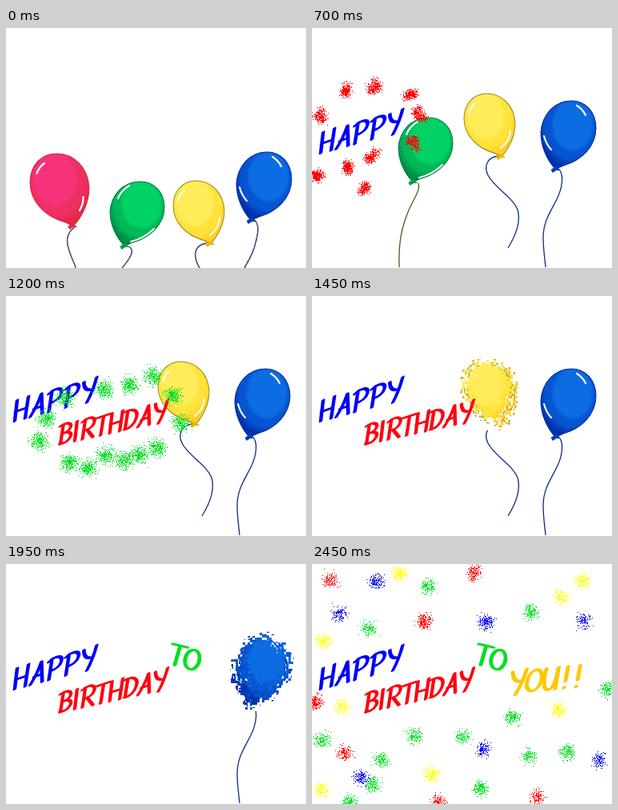
An HTML page with a canvas that plays this animation: 375x300 px, repeating every 3450 ms.

```html
<!DOCTYPE html>
<html lang="en">
<head>
<meta charset="utf-8">
<title>Happy Birthday To You!!</title>
<style>
  html, body { margin: 0; width: 100%; height: 100%; overflow: hidden; background: #fff; }
  canvas { display: block; width: 375px; height: 300px; }
</style>
</head>
<body>
<canvas id="stage" width="375" height="300" role="img" aria-label="HAPPY BIRTHDAY TO YOU!!"></canvas>
<script>
const W = 375, H = 300, LOOP = 3450;
const context = canvas => canvas.getContext('2d', { willReadFrequently: true });
const ctx = context(document.getElementById('stage'));
const RED = '#ff0000', GREEN = '#00e024', BLUE = '#0000fa', YELLOW = '#ffff00';

let seed = 1;
function rand() {
  seed = (Math.imul(seed, 1664525) + 1013904223) >>> 0;
  return seed / 4294967296;
}
const spread = r => (rand() * 2 - 1) * r;
const bell = s => (rand() + rand() + rand() + rand() - 2) * 1.73 * s;

// Balloons: box when risen, offset while low, colours from lit to shaded
const skin = new Path2D('M.26 1C.1 .86 0 .66 0 .47C.02 .2 .25 0 .55 0C.82 0 1 .17 1 .4C1 .68 .72 .88 .42 .95C.35 .97 .3 1 .26 1Z');
const balloons = [
  { x: 17, y: 76, w: 74, h: 90, flip: true, low: [13, 81],
    tones: ['#f6337a', '#ee2f62', '#e02a48'], edge: '#d82848', tie: '#e02a48',
    glints: 'M25.5 101Q28 93 35 88M83.5 130Q84 139 79 147',
    cord: 'M71 168C60 174 64 192 70 204C77 218 86 230 89 250C91 270 88 285 87 300',
    lowCord: 'M86 249C75 256 75 268 79 278C81 286 85 292 87 300' },
  { x: 108, y: 112, w: 68, h: 80, low: [22, 80],
    tones: ['#00d266', '#00b858', '#008c46'], edge: '#007a3c', tie: '#00a04e',
    glints: 'M118 133Q122 123 132 117M134 187Q151 183 163 171',
    cord: 'M133 194C136 203 126 215 120 230C112 250 108 268 109 299',
    lowCord: 'M153 273C162 277 156 287 145 300' },
  { x: 190, y: 82, w: 64, h: 78, flip: true, low: [19, 109],
    tones: ['#ffec58', '#ffe23a', '#ffcf22'], edge: '#9c8a1c', tie: '#f0b400',
    glints: 'M196 107Q198 99 204 94M248 128Q247 142 236 150',
    cord: 'M235 160C220 160 214 172 220 184C228 200 250 210 257 227C262 244 253 262 245 275',
    lowCord: 'M251 269C235 271 233 285 242 300' },
  { x: 286, y: 91, w: 69, h: 85, low: [2, 64],
    tones: ['#0c6ce2', '#0654d0', '#0030ac'], edge: '#002c9c', tie: '#0040b8',
    glints: 'M331 97Q338 101 342 109M290 135Q293 146 299 152',
    cord: 'M307 175C316 181 313 200 306 214C298 230 289 242 289 262C289 276 291 288 292 299',
    lowCord: 'M309 239C318 244 315 258 311 272C308 284 302 292 298 300' }
];

function drawBody(g, b) {
  g.save();
  g.translate(b.flip ? b.x + b.w : b.x, b.y);
  g.scale(b.flip ? -b.w : b.w, b.h);
  const lit = g.createRadialGradient(.58, .36, 0, .58, .36, .8);
  [[0, 0], [.42, 0], [.5, 1], [.62, 1], [.78, 2], [1, 2]]
    .forEach(([at, i]) => lit.addColorStop(at, b.tones[i]));
  g.fillStyle = lit;
  g.fill(skin);
  g.lineWidth = 1 / b.w;
  g.strokeStyle = b.edge;
  g.stroke(skin);
  g.restore();

  const kx = b.x + b.w * (b.flip ? .72 : .27), ky = b.y + b.h - 1;
  g.fillStyle = b.tie;
  g.beginPath();
  g.moveTo(kx, ky - 2);
  g.lineTo(kx + 6, ky + 3);
  g.lineTo(kx + 1, ky + 3);
  g.lineTo(kx - 4, ky + 6);
  g.lineTo(kx - 6, ky + 2);
  g.fill();

  g.strokeStyle = '#f4fbff';
  g.lineWidth = 2.2;
  g.lineCap = 'round';
  g.stroke(new Path2D(b.glints));
}

function drawCord(b, path, low) {
  const p = new Path2D(path);
  ctx.lineWidth = 1.3;
  ctx.strokeStyle = b === balloons[1] && !low ? '#4c5a18' : '#0c2c84';
  ctx.stroke(p);
  if (!low) return;
  ctx.setLineDash([2, 4]);
  ctx.strokeStyle = '#e0305c';
  ctx.stroke(p);
  ctx.lineDashOffset = 3;
  ctx.strokeStyle = '#108070';
  ctx.stroke(p);
  ctx.setLineDash([]);
  ctx.lineDashOffset = 0;
}

function drawBalloon(b, low) {
  drawCord(b, low ? b.lowCord : b.cord, low);
  ctx.save();
  if (low) ctx.translate(...b.low);
  drawBody(ctx, b);
  ctx.restore();
}

// Bursting balloon: small chunks fetched from random neighbours
function drawShattered(b) {
  const copy = document.createElement('canvas');
  copy.width = W;
  copy.height = H;
  drawBody(context(copy), b);
  ctx.save();
  ctx.beginPath();
  ctx.rect(0, b.y + b.h + 8, W, H);
  ctx.clip();
  drawCord(b, b.cord);
  ctx.restore();
  for (let y = b.y - 8; y < b.y + b.h + 12; y += 3)
    for (let x = b.x - 8; x < b.x + b.w + 8; x += 3)
      ctx.drawImage(copy, x + Math.round(spread(6)), y + Math.round(spread(6)), 3, 3, x, y, 3, 3);
}

// Brush lettering: strokes and advance per letter
const P = 'M4 0L2 26M0 3C10 -4 18 0 16 7C15 12 9 15 4 15';
const glyphs = {
  H: ['M3 0L2 26M17 -1L15 26M2 14L16 13', 20],
  A: ['M0 26Q8 14 12 0L15 26M4 17L14 16', 20],
  P: [P, 20],
  Y: ['M1 0C2 8 5 12 11 12M17 -2Q14 14 7 27', 18],
  B: ['M4 1L2 26M0 2C10 -3 17 2 13 8C11 11 8 12 5 12C14 11 17 15 14 20C11 25 6 26 1 25', 19],
  I: ['M3 0L2 26', 10],
  R: [P + 'M7 14L16 26', 19],
  T: ['M0 2L18 0M9 1L7 26', 17],
  D: ['M4 1L2 25M0 2C12 -2 18 5 16 13C14 21 8 26 1 25', 19],
  O: ['M10 0C3 2 0 10 1 17C3 26 11 27 15 20C20 12 18 0 10 0Z', 20],
  U: ['M2 0C0 12 0 25 7 25C13 25 15 12 16 0L15 25', 22],
  '!': ['M5 0L4 17M3 24L3.2 25', 14]
};
const words = [
  { text: 'HAPPY', x: 11, y: 131, tilt: -.27, lean: -.08, size: 1, gap: 1.3, ink: BLUE },
  { text: 'BIRTHDAY', x: 68, y: 161, tilt: -.22, lean: -.08, size: .95, gap: 0, ink: '#ff0010' },
  { text: 'TO', x: 209, y: 98, tilt: .35, lean: -.2, size: 1, gap: 0, ink: GREEN },
  { text: 'YOU!!', x: 250, y: 135, tilt: -.1, lean: -.12, size: 1.08, gap: 0, ink: '#ffc800' }
];

function drawWord(w) {
  ctx.save();
  ctx.transform(w.size, w.tilt * w.size, w.lean * w.size, w.size, w.x, w.y);
  ctx.strokeStyle = w.ink;
  ctx.lineWidth = 2.4;
  ctx.lineCap = ctx.lineJoin = 'round';
  for (const c of w.text) {
    const [path, step] = glyphs[c], p = new Path2D(path);
    for (const nib of [-1, 0, 1]) {
      ctx.save();
      ctx.translate(nib * 1.1, -nib * .3);
      ctx.stroke(p);
      ctx.restore();
    }
    ctx.translate(step + w.gap, 0);
  }
  ctx.restore();
}

// Sprayed dots
function spray(x, y, size, count, ink) {
  ctx.fillStyle = ink;
  for (let i = 0; i < count; i++)
    ctx.fillRect(Math.round(x + bell(size)), Math.round(y + bell(size)), 1, 1);
}
const pairs = list => list.flatMap((v, i) => i % 2 ? [] : [[v, list[i + 1]]]);
const ring = (n, x, y, rx, ry) => Array.from({ length: n }, (_, i) => {
  const a = i / n * Math.PI * 2;
  return [x + rx * Math.cos(a) + spread(5), y + ry * Math.sin(a) + spread(5)];
});

function clumps(points, ink) {
  for (const [x, y] of points)
    for (let k = 0; k < 4; k++) spray(x + spread(6), y + spread(6), 2.9, 75, ink);
}
function puffs(points, ink) {
  for (const [x, y] of points) spray(x, y, 5.2, 270, ink);
}
const bursts = [
  () => clumps(pairs([42, 78, 76, 72, 124, 84, 134, 105, 9, 108, 126, 145, 6, 183, 43, 173, 77, 160, 66, 198]), RED),
  () => puffs(pairs([50, 153, 74, 127, 122, 116, 154, 111, 183, 99, 208, 124, 218, 158, 41, 181,
    79, 208, 102, 214, 125, 199, 146, 205, 166, 198, 188, 190]), GREEN),
  () => puffs(ring(12, 225, 114, 62, 48), YELLOW),
  () => puffs(ring(14, 298, 142, 62, 62), BLUE)
];

const confetti = [
  [RED, [22, 20, 202, 11, 140, 71, 41, 236, 4, 172, 157, 297, 281, 291]],
  [BLUE, [80, 22, 34, 62, 218, 72, 339, 71, 214, 231, 358, 245, 61, 267]],
  [YELLOW, [108, 12, 337, 20, 311, 41, 13, 96, 37, 178, 308, 182, 149, 263, 11, 282]],
  [GREEN, [145, 28, 71, 80, 273, 60, 251, 191, 369, 156, 12, 219, 128, 214, 188, 215,
    86, 245, 271, 240, 319, 235, 75, 275, 210, 280, 47, 297]]
];
function drawConfetti() {
  for (const [ink, list] of confetti)
    for (const [x, y] of pairs(list)) spray(x, y, 4.5, 130 + rand() * 90, ink);
}

// Each balloon shatters, then gives way to its word
function drawScene(step) {
  seed = 71 + step * 977;
  ctx.fillStyle = '#fff';
  ctx.fillRect(0, 0, W, H);
  balloons.forEach((b, i) => {
    const bang = 2 * i + 2;
    if (step < bang) drawBalloon(b, step === 0);
    else if (step === bang) drawShattered(b);
  });
  if (step === 10) drawConfetti();
  words.forEach((w, i) => { if (step >= 2 * i + 3) drawWord(w); });
  if (step >= 3 && step < 10 && step % 2) bursts[(step - 3) / 2]();
}

let shown = -1;
function tick() {
  const t = performance.now() % LOOP;
  const step = t < 200 ? 0 : Math.min(10, 1 + Math.floor((t - 200) / 250));
  if (step !== shown) drawScene(shown = step);
  requestAnimationFrame(tick);
}
tick();
</script>
</body>
</html>
```
